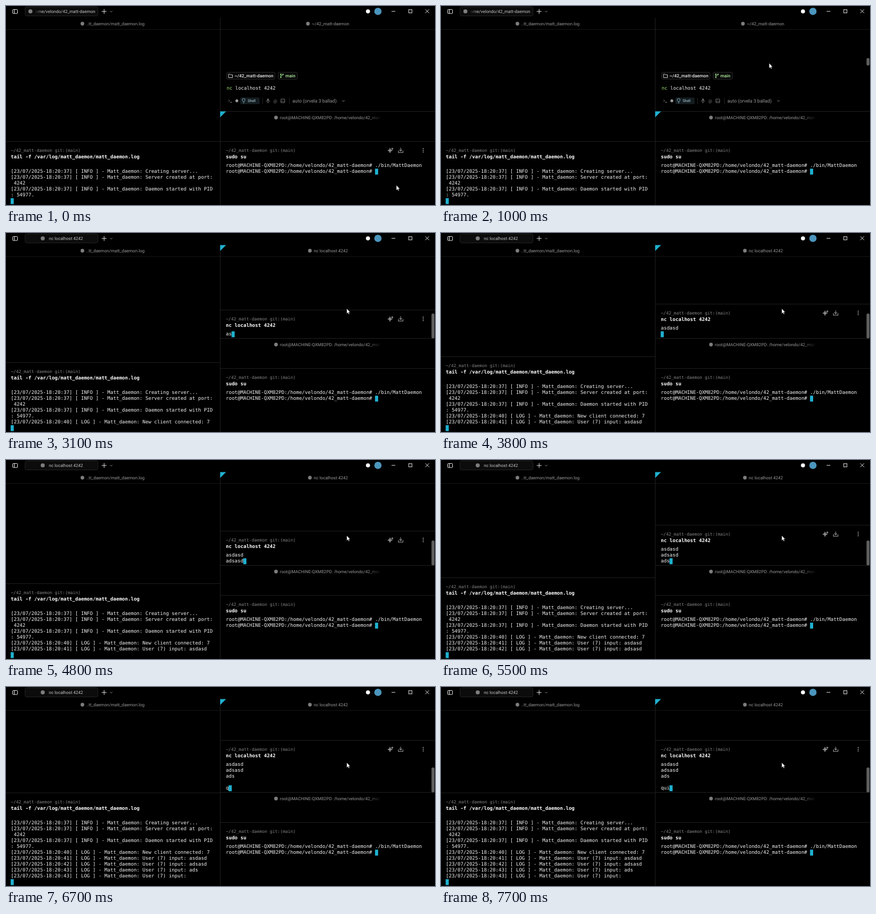
Write an HTML page that moves like this. It is 800 px wide and 371 px high and loops after 8000 ms.

```html
<!DOCTYPE html>
<html lang="en">
<head>
<meta charset="utf-8">
<title>Terminal panes</title>
<style>
html, body { margin: 0; width: 100%; height: 100%; overflow: hidden; background: #000; }
svg { display: block; width: 800px; height: 371px; }
text { white-space: pre; text-rendering: geometricPrecision; font: 8.05px Roboto, sans-serif; fill: #989898; }
.mono { font: 9.07px "DejaVu Sans Mono", monospace; fill: #f2f2f2; }
.bold { font-weight: bold; fill: #fff; }
.path { font-size: 8px; fill: #858585; }
.chip { font-size: 8.35px; font-weight: 500; }
.icon { fill: none; stroke: #8c8c8c; stroke-width: 1; }
.white { stroke: #e8e8e8; }
.dim, .dim .icon { stroke: #707070; }
</style>
</head>
<body>
<svg viewBox="0 0 800 371">
  <defs>
    <linearGradient id="fadeL"><stop stop-color="#0c0c0c"/><stop offset="1" stop-color="#0c0c0c" stop-opacity="0"/></linearGradient>
    <linearGradient id="fadeR"><stop stop-opacity="0"/><stop offset="1"/></linearGradient>
  </defs>

  <!-- title bar -->
  <g class="icon white">
    <rect x="12.5" y="6.5" width="9" height="7.5" rx="1"/>
    <path d="M15.5 6.5v7.5M178.5 10.2h9M183 5.7v9M719 10h7M782 6.3l7 7M789 6.3l-7 7"/>
    <rect x="751" y="6.8" width="6" height="6"/>
  </g>
  <path class="icon" d="M194.3 9.3l2 2 2-2"/>
  <circle cx="675" cy="10" r="3.8" fill="#fff"/>
  <circle cx="693.6" cy="10" r="6.8" fill="#4b95bd"/>
  <rect x="35.5" y="1.5" width="136" height="17" rx="3" fill="#0c0c0c" stroke="#222"/>

  <!-- pane borders -->
  <path fill="#202020" d="M399 22h1v349h-1zM400 196h400v1h-400z"/>
  <path fill="#171717" d="M0 43.3h399v1h-399zM400 43.3h400v1h-400z"/>
  <g id="scene"></g>
  <path id="mouse" d="M0 0V9.2L2.1 7.3 3.6 10.4 5 9.8 3.5 6.8H6.3Z" fill="#fff" stroke="#222" stroke-width=".4"/>
</svg>
<script>
const LOOP = 8000, ROW = 11, CHAR = 5.46, LAST_ROW = 365.9;
const USER = 'velondo', HOST = 'MACHINE-QXM82PD', DIR = '42_matt-daemon';
const CLICK = 1400, RUN = 1900, CONNECT = 2300;

// [start, keys, delay between keys]
const KEYS = [
  [3000, 'asdasd', 98], [3790, '\n'],
  [4000, 'adsasd', 140], [4890, '\n'],
  [5200, 'ads', 140], [5790, '\n'], [5880, '\n'],
  [6700, 'q'], [7000, 'u'], [7200, 'i']
];
// [time, x, y]
const MOUSE = [[100, 728, 334.2], [1000, 612, 106.7], [1500, 635.5, 141]];

const scene = document.getElementById('scene');
const mouse = document.getElementById('mouse');

const text = (x, y, s, cls = '', extra = '') => `<text x="${x}" y="${y}" class="${cls}" ${extra}>${s}</text>`;
const mono = (x, y, s, cls = '', extra = '') => text(x, y, s, 'mono ' + cls, extra);
const rect = (x, y, w, h, fill, extra = '') => `<rect x="${x}" y="${y}" width="${w}" height="${h}" fill="${fill}" ${extra}/>`;
const dot = (x, y, r, fill = '#7d7d7d') => `<circle cx="${x}" cy="${y}" r="${r}" fill="${fill}"/>`;
const icon = (d, extra = '') => `<path class="icon" d="${d}" ${extra}/>`;
const caret = (x, y) => rect(x - .3, y - 7.6, 5.8, ROW, '#1fb1d0');
const title = (x, y, s) => dot(x, y, 3.4) + text(x + 7.3, y + 2.8, s);

function mouseAt(t) {
  let [, x, y] = MOUSE[0];
  for (let i = 1; i < MOUSE.length; i++) {
    const [t0, x0, y0] = MOUSE[i - 1], [t1, x1, y1] = MOUSE[i];
    if (t < t0) break;
    const p = Math.min(1, (t - t0) / (t1 - t0)), e = p * p * (3 - 2 * p);
    x = x0 + (x1 - x0) * e;
    y = y0 + (y1 - y0) * e;
  }
  return [x, y];
}

function typedAt(t) {
  let s = '';
  for (const [start, keys, gap = 0] of KEYS)
    [...keys].forEach((k, i) => { if (t >= start + i * gap) s += k; });
  return s.split('\n');
}

// border, header and command of a block; y is the baseline of the first output row
function block(x, y, width, cmd, gap) {
  const base = y - gap;
  return rect(x < 400 ? 0 : 400, Math.round(base - 32), width, 1, '#1e1e1e') +
    mono(x, base - 11.9, `~/${DIR} git:(main)`, 'path') +
    mono(x, base, cmd, 'bold');
}

// hover tools beside a block header; y is the baseline of the first output row
function blockIcons(row) {
  const y = row - 30.9;
  return `<path fill="#8c8c8c" stroke="#8c8c8c" stroke-width=".7" d="M716 ${y - 4.2}l1.3 3.3 3.4 1.3-3.4 1.3-1.3 3.3-1.3-3.3-3-1.3 3-1.3zM720.3 ${y - 4.8}l.6 1.4 1.4.6-1.4.6-.6 1.4-.6-1.4-1.4-.6 1.4-.6z"/>` +
    icon(`M731.7 ${y + .5}v3.7h8.6v-3.7M736 ${y - 4.8}v6M733.6 ${y - 1}l2.4 2.4 2.4-2.4`, 'style="stroke-width:1.2"') +
    [-3.3, 0, 3.3].map(d => dot(778, y + d, 1, '#a0a0a0')).join('');
}

function logPane(t, typed) {
  const line = (sec, kind, msg) => `[23/07/2025-18:20:${sec}] [ ${kind} ] - Matt_daemon: ${msg}`;
  const rows = [
    line(37, 'INFO', 'Creating server...'),
    line(37, 'INFO', 'Server created at port:'), ' 4242',
    line(37, 'INFO', 'Daemon started with PID'), ': 54977.'
  ];
  if (t >= CONNECT) rows.push(line(40, 'LOG', 'New client connected: 7'));
  typed.slice(0, -1).forEach((s, i) => rows.push(line([41, 42, 43, 43][i], 'LOG', 'User (7) input: ' + s)));
  const top = LAST_ROW - rows.length * ROW;
  return block(9, top, 399, 'tail -f /var/log/matt_daemon/matt_daemon.log', 26.6) +
    rows.map((s, i) => mono(9, top + i * ROW, s)).join('') + caret(9, LAST_ROW);
}

function promptPane() {
  const sep = x => rect(x, 171, 1, 12, '#222');
  return rect(411.5, 123.5, 90, 13, '#080808', 'rx="2" stroke="#282828"') +
    icon('M415 127v6.5h7.5v-5.3h-4l-1-1.2z', 'style="stroke:#ccc"') +
    text(426, 133, `~/${DIR}`, 'chip', 'style="fill:#eee"') +
    rect(507.5, 123.5, 36, 13, '#080808', 'rx="2" stroke="#282828"') +
    icon('M512.5 128v4.2M512.5 131c0-2 4-1 4-3', 'style="stroke:#9be08a"') +
    dot(512.5, 127.3, 1.2, '#9be08a') + dot(512.5, 133, 1.2, '#9be08a') + dot(516.5, 127.5, 1.2, '#9be08a') +
    text(521, 133, 'main', 'chip', 'style="fill:#b5f2a3"') +
    mono(411.5, 155.6, '<tspan fill="#a0e070">nc</tspan> localhost 4242', '', 'style="font-size:8.92px"') +
    icon('M415 174.5l2 2-2 2M418 179.5h3.5') + dot(430.5, 176.7, 2.7, '#999') +
    rect(437, 170.5, 36, 12.5, '#141c20', 'rx="2"') +
    icon('M442 178.3c0-1.2-1.4-1.5-1.4-3.3a2.6 2.6 0 0 1 5.2 0c0 1.8-1.4 2.1-1.4 3.3zM442 180.5h2.4', 'style="stroke:#9ccbdc;stroke-width:.8"') +
    text(450.7, 179.2, 'Shell', '', 'style="font-size:6.8px;fill:#b4d3de"') +
    sep(478) + sep(528) +
    '<g class="dim">' +
    rect(487.2, 172.5, 2.8, 5, '#707070', 'rx="1.4" stroke="none"') + icon('M485.5 176c0 4 6 4 6 0M488.5 179v2.3') +
    icon('M512.7 173.5h7v6.7h-7zM513 179l2.2-2.5 1.5 1.5 1-1 2 2') + '</g>' +
    text(498.5, 179.5, '@', '', 'style="fill:#707070"') +
    text(534, 180, 'auto (orvela 3 ballad)', '', 'style="font-size:8.8px"') +
    icon('M627 175.8l2.3 2.3 2.3-2.3');
}

function clientPane(t, typed) {
  if (t < RUN) return title(563, 33, `~/${DIR}`) + promptPane();
  const last = 190.9, top = last - (typed.length - 1) * ROW;
  const s = title(566.7, 33, 'nc localhost 4242') + block(410, top, 400, 'nc localhost 4242', 16.3);
  if (t < CONNECT) return s;
  return s + typed.map((row, i) => mono(410, top + i * ROW, row)).join('') +
    caret(410 + typed.at(-1).length * CHAR, last) + blockIcons(top);
}

function rootPane(hover) {
  const prompt = `root@${HOST}:/home/${USER}/${DIR}# `, top = 299.9;
  return title(503.5, 208, `root@${HOST}: /home/${USER}/42_matt-d`) +
    rect(675, 202, 24, 12, 'url(#fadeR)') + rect(698, 202, 30, 12, '#000') +
    block(410, top, 400, 'sudo su', 15.6) +
    mono(410, top, prompt + './bin/MattDaemon') + mono(410, top + ROW, prompt) +
    caret(410 + prompt.length * CHAR, top + ROW) + (hover ? blockIcons(top) : '');
}

function tab(t) {
  const light = 'style="fill:#c4c4c4"';
  if (t >= RUN) return dot(68.5, 10, 3.8) + text(80, 12.9, 'nc localhost 4242', '', light);
  if (t >= CLICK) return dot(65, 10, 3.8) + text(76.5, 12.9, `~/${DIR}`, '', light);
  return text(166.5, 12.9, `ome/${USER}/${DIR}`, '', 'text-anchor="end" ' + light) +
    rect(54, 4, 13, 13, 'url(#fadeL)') + dot(45.5, 10, 3.8);
}

function scrollbar(t, y) {
  if (y >= 196) return '';
  const [top, height] = t < RUN ? [97, 14] : [150, 46.5];
  return rect(793.5, top, 5.5, height, '#606060', 'rx="2.7"');
}

let shown = '';
function draw(now) {
  const t = now % LOOP, typed = typedAt(t), [x, y] = mouseAt(t);
  const focusY = t < CLICK ? 196.5 : 22.5;
  const html = tab(t) + title(142.5, 33, '..tt_daemon/matt_daemon.log') +
    logPane(t, typed) + clientPane(t, typed) + rootPane(y > 252) + scrollbar(t, y) +
    `<path fill="#1fb1d0" d="M399.4 ${focusY}h11l-11 11z"/>`;
  if (html !== shown) scene.innerHTML = shown = html;
  mouse.setAttribute('transform', `translate(${x} ${y})`);
  requestAnimationFrame(draw);
}
draw(performance.now());
</script>
</body>
</html>
```
